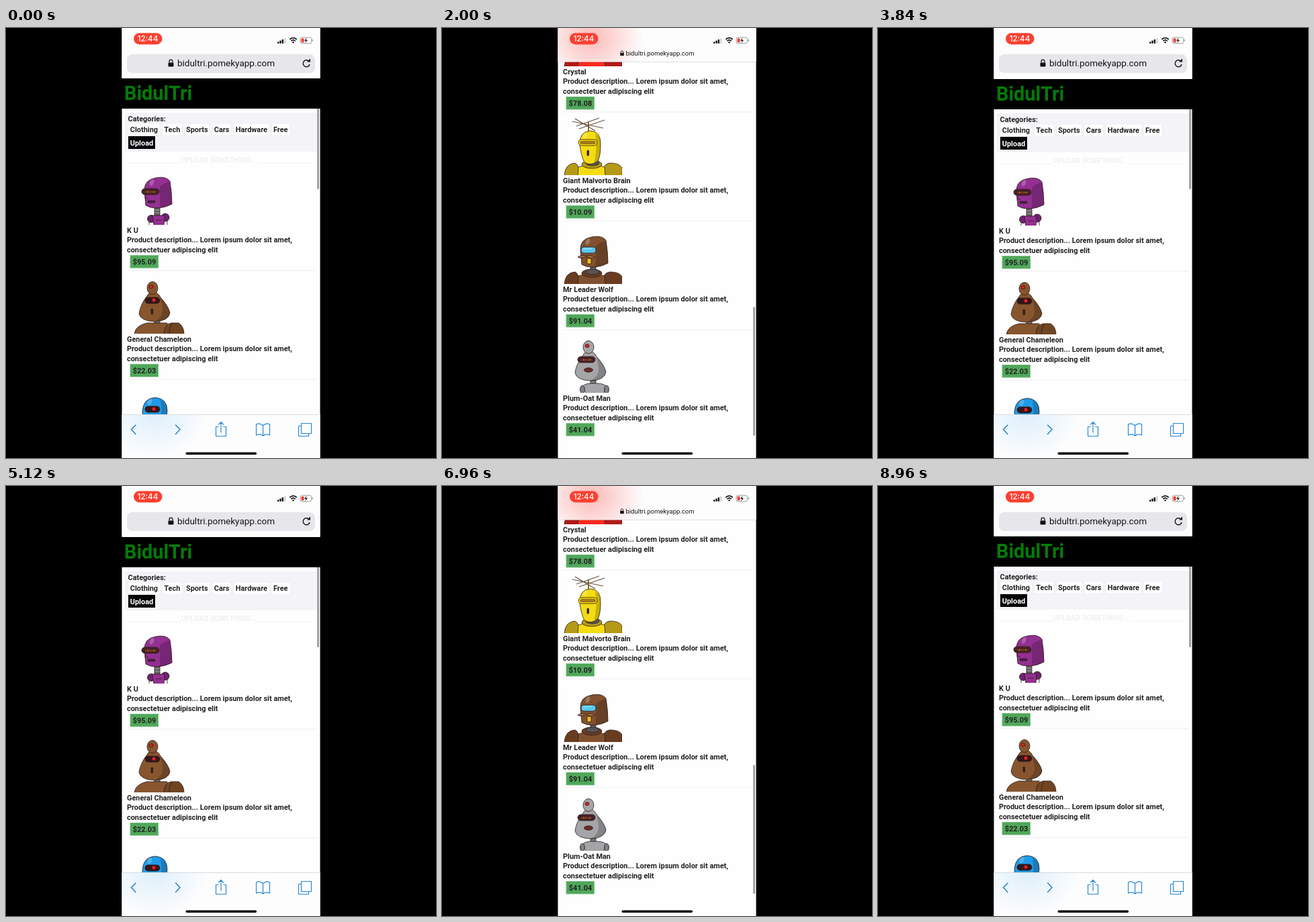
An HTML page that plays this animation: 640x640 px, repeating every 9040 ms.

```html
<!DOCTYPE html>
<html lang="en">
<head>
<meta charset="utf-8">
<title>Shop scroll</title>
<style>
html, body { margin: 0; width: 100%; height: 100%; overflow: hidden; background: #000; }
svg { display: block; width: 100vw; height: 100vh; }
text { font-family: Roboto, sans-serif; font-weight: 700; font-size: 10.9px; fill: #222; white-space: pre; }
.brand { font-size: 28.8px; fill: #067a08; }
.faint { font-weight: 400; font-size: 10px; letter-spacing: .4px; fill: #e9e9ec; }
.url { font-weight: 400; fill: #151515; text-anchor: middle; }
.clock { font: 500 11.6px Inter, sans-serif; fill: #fff; text-anchor: middle; }
.icon { fill: none; stroke: #2b87d3; stroke-width: 1.2; stroke-linejoin: round; stroke-linecap: round; }
.bot { stroke: #2b1c1a; stroke-width: .8; stroke-linejoin: round; }
</style>
</head>
<body>
<svg id="stage" viewBox="0 0 640 640"></svg>
<script>
const LOOP = 9040, TURN = 4480, STEP = 80;
const REST = 302, GAP = 162, LAST = 1047;
const SITE = 'bidultri.pomekyapp.com';

const rect = (x, y, w, h, fill, more = '') =>
  `<rect x="${x}" y="${y}" width="${w}" height="${h}" fill="${fill}" ${more}/>`;
const path = (d, fill, more = '') => `<path d="${d}" fill="${fill}" ${more}/>`;
const oval = (x, y, rx, ry, fill, more = '') =>
  `<ellipse cx="${x}" cy="${y}" rx="${rx}" ry="${ry}" fill="${fill}" ${more}/>`;
const text = (x, y, s, more = '') => `<text x="${x}" y="${y}" ${more}>${s}</text>`;

// Robot parts, drawn in an 88 x 87 box
const shade = d => path(d, 'rgba(0,0,0,.2)', 'stroke="none"');
const shine = (x, y) => oval(x, y, 3, 5, 'rgba(255,255,255,.22)', `stroke="none" transform="rotate(25 ${x} ${y})"`);
const heads = {
  box: c => path('M26 37Q25 20 43 17Q58 14 64 22Q67 40 67 56Q56 62 44 62Q34 62 28 58Z', c) +
    shade('M49 30Q56 24 64 23Q67 40 67 56Q58 61 49 61Z') + shine(37, 24),
  pear: c => path('M37 25Q46 24 50 33Q62 46 64 56Q62 68 41 69Q20 68 18 57Q20 44 29 32Q32 26 37 25Z', c) +
    shade('M50 33Q62 46 64 56Q62 68 41 69Q54 62 53 50Z') +
    oval(38, 19, 8, 9.5, c) + oval(36, 17, 3, 2.5, '#d22'),
  dome: c => path('M25 42Q24 22 41 21Q57 22 56 42Q56 58 52 66Q42 74 32 68Q27 58 25 42Z', c) +
    shade('M48 25Q57 30 56 42Q56 58 52 66L46 70Q52 48 48 25Z') + shine(33, 28),
  helmet: c => path('M23 41Q24 21 42 20Q60 21 60 40Q59 52 53 58L51 77Q42 81 34 77L32 57Q23 52 23 41Z', c) +
    shade('M50 23Q60 28 60 40Q59 52 53 58L51 77L46 78Q54 50 50 23Z') + shine(34, 27)
};
const pill = (x, y, w, c) => rect(x, y, w, 9, c, 'rx="4.5"');
const eyes = {
  band: pill(22, 33, 26, '#4b202c') + rect(26, 36, 18, 4, '#7a3423', 'rx="2"') +
    oval(31, 38, 1.4, 1.4, '#f0a030') + oval(40, 38, 1.4, 1.4, '#f0a030'),
  red: pill(27, 33, 22, '#35161a') + oval(40, 37, 3, 3, '#e82020'),
  round: oval(31, 39, 4.5, 5, '#4a1518') + oval(45, 39, 5, 5, '#4a1518') +
    oval(31, 39, 1.6, 2, '#7d2420') + oval(45, 39, 1.6, 2, '#7d2420'),
  glass: rect(27, 32, 22, 9, '#58c8f0', 'rx="4"') + path('M30 35L43 34', 'none', 'stroke="#d5f3ff"'),
  bar: y => pill(23, 34, 28, y) + rect(26, 37, 22, 3, '#c98d20', 'rx="1.5"')
};
const slit = rect(36, 50, 2.5, 8, '#3a1c18', 'rx="1"');
const tash = path('M22 47Q27 50 35 46Q43 51 48 47Q42 43 35 45Q27 43 22 47Z', '#a4673f');
const grid = rect(30, 48, 18, 9, '#f3ad1d', 'rx="1.5"') +
  path('M30 52H48M36 48V57M42 48V57', 'none', 'stroke="#b03a14"');
const mouths = {
  slit, grid,
  line: path('M28 43L27 48H32', 'none') + rect(31, 51, 11, 3, '#4d1d4c', 'rx="1.5"'),
  tash: tash + grid,
  tooth: rect(36, 49, 6, 8, '#f0c01c', 'rx="1"') + tash,
  oval: oval(38, 53, 6.5, 3.2, '#6d2b2b')
};
const neck = (y, h) => rect(41, y, 8, h, '#85868b') +
  path(`M41 ${y + 3}h8M41 ${y + 7}h8M41 ${y + 11}h8`, 'none');
const bodies = {
  small: (c, d) => neck(60, 13) + oval(36, 78, 5.5, 5.5, d) + oval(57, 76, 6, 6, d) +
    path('M38 73H56L55 88H40Z', c) + path('M33 83V88M60 81V88M43 80h9', 'none'),
  arm: (c, d) => neck(64, 10) + path('M11 88Q12 75 30 71H60V88Z', c) +
    path('M55 88Q55 73 66 71H77Q85 76 85 88Z', d) + path('M63 88Q62 79 67 72', 'none'),
  broad: (c, d) => neck(60, 10) + path('M2 88Q3 70 18 69Q25 72 24 88Z', d) +
    path('M60 88Q58 70 70 69Q84 69 88 76V88Z', d) + path('M22 88L23 75Q42 68 62 75L63 88Z', c) +
    oval(43, 71, 15, 6, d) + oval(44, 69, 10, 4, '#555'),
  slim: (c, d) => path('M16 72L18 90M66 72L69 90', 'none', 'stroke-width="6"') +
    oval(22, 70, 6.5, 6.5, d) + oval(62, 70, 6.5, 6.5, d) + path('M25 62Q42 54 59 62L58 88H28Z', c),
  post: c => rect(41, 60, 9, 20, '#77787c') + path('M41 65h9M41 69h9M41 73h9M41 77h9', 'none') +
    rect(40, 80, 12, 9, c),
  bust: (c, d) => neck(66, 8) + path('M28 78Q34 72 45 73Q60 72 66 78L60 88H35Z', c) +
    oval(29, 82, 3.5, 6, d) + oval(65, 82, 3.5, 6, d)
};
const mast = path('M36 6V20M32 10h8M33 14h7', 'none', 'stroke="#999" stroke-width="1.6"') + oval(36, 4, 2, 2, '#e02020');
const aerial = path('M38 8V23', 'none', 'stroke="#8a7412" stroke-width="2"') +
  path('M14 7L60 17M20 14L54 2M24 18L62 5M18 3L48 21', 'none', 'stroke="#665044" stroke-width="1.2"');

const items = [
  ['K U', '95.09', '#943092', '#6f226f', 'box', eyes.band, 'line', 'small'],
  ['General Chameleon', '22.03', '#87562f', '#704522', 'pear', eyes.red, 'slit', 'arm'],
  ['Space Crane Fist', '45.05', '#209be8', '#1976b5', 'helmet', eyes.red, 'slit', 'slim'],
  ['Mr Pellam', '98.07', '#7a4a2c', '#623a20', 'box', eyes.round, 'grid', 'post', mast],
  ['The Vibe', '63.02', '#f5281f', '#c81f1a', 'dome', eyes.glass, 'tash', 'arm'],
  ['Crystal', '78.08', '#f8291f', '#b01a18', 'dome', eyes.red, 'slit', 'broad'],
  ['Giant Malvorto Brain', '10.09', '#f5dc12', '#b59a17', 'dome', eyes.bar('#f3d010'), 'slit', 'broad', aerial],
  ['Mr Leader Wolf', '91.04', '#80502f', '#693c20', 'box', eyes.glass, 'tooth', 'broad'],
  ['Plum-Oat Man', '41.04', '#a5a5a9', '#7f7f84', 'pear', eyes.band, 'oval', 'bust']
];

const card = ([name, price, c, d, head, eye, mouth, body, top = ''], i) => {
  const y = REST + GAP * i;
  return `<g class="bot" transform="translate(180 ${y - 95})" clip-path="url(#photo)">` +
    top + bodies[body](c, d) + heads[head](c) + eye + mouths[mouth] + '</g>' +
    text(180, y + 3.8, name) +
    text(180, y + 17.6, 'Product description... Lorem ipsum dolor sit amet,') +
    text(180, y + 33, 'consectetuer adipiscing elit') +
    rect(185, y + 37.5, 41.5, 18.5, '#50a75a', 'stroke="#76bd7e"') +
    text(188.8, y + 50.7, '$' + price) +
    (i < 8 ? rect(180, y + 59.5, 283, 1, '#efeff1') : '');
};

const tag = ([x, w, tx, s]) =>
  rect(x, 143, w, 18, '#fff', 'stroke="#ebebee" stroke-width=".8"') + text(tx, 155.6, s);

const page = rect(172, -200, 296, 276, '#fdfdfe') + rect(172, 121, 296, 1800, '#fefefe') +
  rect(172, 76, 296, 45, '#000') + text(176, 108, 'BidulTri', 'class="brand"') +
  rect(177, 127, 286, 58, '#f4f3f7') + text(181.5, 139.6, 'Categories:') +
  [[182, 47, 184.8, 'Clothing'], [233, 29, 235.3, 'Tech'], [266, 37, 268, 'Sports'],
   [307, 28, 309.8, 'Cars'], [339, 53, 341.8, 'Hardware'], [395, 28, 398, 'Free']].map(tag).join('') +
  rect(182, 162, 40, 19, '#050507') + text(184.8, 175.5, 'Upload', 'style="fill:#fff"') +
  text(261, 200.6, 'UPLOAD SOMETHING...', 'class="faint"') +
  rect(182, 202, 79, 1, '#f2f2f4') + rect(376, 202, 80, 1, '#f2f2f4') +
  items.map(card).join('');

// Soft tint of the page seen through the bars
const glow = '<rect x="172" y="76" width="296" height="45" opacity=".12"/>' +
  items.map((it, i) => oval(222, REST - 50 + GAP * i, 78, 66, `url(#glow${i})`)).join('');
const grads = items.map((it, i) => `<radialGradient id="glow${i}">
  <stop offset="0" stop-color="${it[2]}" stop-opacity="${i == 5 ? .32 : .14}"/>
  <stop offset="1" stop-color="${it[2]}" stop-opacity="0"/></radialGradient>`).join('');

const lock = '<g id="lock">' + rect(-4, -1, 8, 6, '#111', 'rx="1"') +
  path('M-2.4 -1V-3A2.4 2.4 0 0 1 2.4 -3V-1', 'none', 'stroke="#111" stroke-width="1.3"') + '</g>';

const status = rect(190, 7.5, 42.5, 17, '#fb4030', 'rx="8.5"') + text(211, 20.2, '12:44', 'class="clock"') +
  [0, 1, 2, 3].map(i => rect(404 + i * 3.3, 20.5 - i * 1.7, 2.3, 2.5 + i * 1.7, i < 3 ? '#111' : '#ccc', 'rx=".5"')).join('') +
  path('M422.3 17Q427.5 12.4 432.7 17M424.3 19.3Q427.5 16.6 430.7 19.3', 'none', 'stroke="#111" stroke-width="1.7"') +
  path('M425.8 21L427.5 23L429.2 21Q427.5 19.6 425.8 21Z', '#111') +
  rect(438, 14, 16.5, 9, 'none', 'rx="2.5" stroke="#999"') + rect(439.5, 15.5, 4, 6, '#f33a30', 'rx="1"') +
  rect(455.6, 17, 1.3, 3, '#999', 'rx=".6"') + path('M447.5 14.5L444 19H446.5L445 22.8L449 18H446.5Z', '#111');

const tools = path('M193 591L186.5 597.5L193 604.5M252.5 591L259 597.5L252.5 604.5', 'none', 'stroke-width="1.6"') +
  path('M316 593.5H312.5V607.5H327.5V593.5H324M320 602V587M316.5 590L320 586.5L323.5 590', 'none') +
  path('M382.5 591.5Q377 587 372.5 590V606Q378 603.5 382.5 607Q387 603.5 392.5 606V590Q388 587 382.5 591.5V607', 'none') +
  path('M439.5 592.5H435.5V607.5H450.5V603.5M439.5 588.5H454.5V603.5H439.5Z', 'none');

const stage = document.getElementById('stage');
stage.innerHTML = `<defs>${grads}
  <clipPath id="photo"><rect width="88" height="87"/></clipPath>
  <clipPath id="phone"><rect x="172.5" width="295" height="640"/></clipPath>
  <clipPath id="bars"><rect id="topClip" x="172" width="296" height="75"/><rect id="lowClip" x="172" y="575" width="296" height="65"/></clipPath></defs>
  <rect width="640" height="640"/>
  <g clip-path="url(#phone)">
    <g id="page">${page}</g>
    ${rect(463, 76, 3, 164, '#000', 'id="thumb" rx="1.5" opacity=".36"')}
    ${rect(172, 0, 296, 75, '#fdfdfe', 'id="top"')}
    ${rect(172, 575, 296, 66, '#fdfdfe', 'id="low"')}
    <g clip-path="url(#bars)"><g id="glow">${glow}</g></g>
    ${rect(172, 50, 296, .7, '#d5d5d8', 'id="edge"')}
    ${rect(180, 39, 280, 28, '#e7e6ea', 'id="field" rx="8"')}
    <g id="reload">${path('M451.3 50A5 5 0 1 0 452 54', 'none', 'stroke="#111" stroke-width="1.4"')}${path('M448 50.5H453V45.5Z', '#111')}</g>
    ${lock}${text(327, 57, SITE, 'id="url" class="url"')}
    ${status}
    <g id="tools">${rect(172, 575, 296, .8, '#d4d4d8')}<g class="icon">${tools}</g></g>
    ${rect(267.5, 631.5, 105.5, 3.6, '#000', 'rx="1.8"')}
  </g>`;

const el = id => document.getElementById(id);
const set = (id, attrs) => { for (const k in attrs) el(id).setAttribute(k, attrs[k]); };
const clamp = v => Math.max(0, Math.min(1, v));
const mix = (a, b, k) => a + (b - a) * k;

// Time and distance scrolled
const keys = [[0, 1], [160, 22], [320, 85], [880, 339], [1280, 690], [1720, 1025], [1920, LAST],
  [2160, LAST], [2400, 900], [2880, 170], [3120, 12], [3280, 0], [4160, 0], [4480, 42]];
const rise = i => (keys[i + 1][1] - keys[i][1]) / (keys[i + 1][0] - keys[i][0]);
const slope = i => {
  if (i == 0 || i == keys.length - 1) return i ? rise(i - 1) : rise(0);
  const a = rise(i - 1), b = rise(i);
  return a * b <= 0 ? 0 : 2 * a * b / (a + b);
};
function scrolled(t) {
  let i = 0;
  while (i < keys.length - 2 && t > keys[i + 1][0]) i++;
  const [t0, y0] = keys[i], [t1, y1] = keys[i + 1], w = t1 - t0, u = (t - t0) / w, v = 1 - u;
  return y0 * v * v * (1 + 2 * u) + y1 * u * u * (3 - 2 * u) + w * u * v * (slope(i) * v - slope(i + 1) * u);
}

function draw(ms) {
  const step = Math.floor(ms % LOOP / STEP) * STEP;
  const t = step > TURN ? 2 * TURN - step : step; // plays forward, then back
  const y = scrolled(t);
  const open = t > 2000 && t < 4160;
  const k = open ? clamp((2720 - t) / 240) : clamp((y - 1) / 80);
  const bar = mix(75, 50, k), low = mix(575, 640, k), show = clamp(1 - 1.6 * k);
  const move = `translate(0 ${-y})`;
  set('page', { transform: move });
  set('glow', { transform: move });
  set('top', { height: bar });
  set('topClip', { height: bar });
  set('low', { y: low });
  set('lowClip', { y: low });
  set('edge', { y: bar, opacity: k });
  set('tools', { transform: `translate(0 ${low - 575})` });
  set('field', { y: mix(39, 29, k), height: mix(28, 18, k), opacity: show });
  set('reload', { opacity: show, transform: `translate(0 ${-15 * k})` });
  set('lock', { transform: `translate(${mix(245.5, 268, k)} ${mix(52.5, 37.8, k)}) scale(${mix(1, .7, k)})` });
  set('url', { x: mix(327.5, 324.5, k), y: mix(57.3, 41, k), 'font-size': 0 });
  el('url').style.fontSize = mix(13.5, 9.5, k) + 'px';
  const len = mix(164, 192, k), part = clamp((bar - 76 + y) / (LAST - 26)) ** 1.05;
  set('thumb', { y: bar + 1 + part * (mix(498, 556, k) - len), height: len });
}

const start = performance.now();
function tick() {
  draw(performance.now() - start);
  requestAnimationFrame(tick);
}
tick();
</script>
</body>
</html>
```
